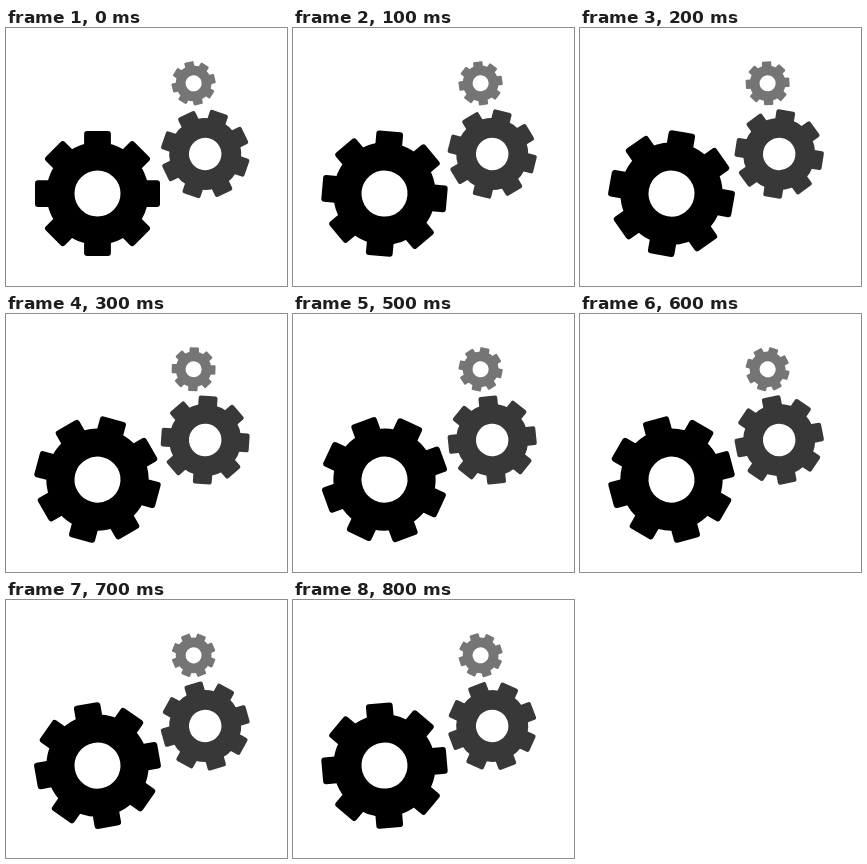
These frames come from a looping animation (281 by 258 pixels, 0.9 s). An HTML page:

```html
<!DOCTYPE html>
<html lang="en">
<head>
<meta charset="utf-8">
<title>Gears</title>
<style>
  html, body { margin: 0; width: 100%; height: 100%; overflow: hidden; background: #fff; }
  svg { display: block; width: 100%; height: 100%; }
</style>
</head>
<body>
<svg viewBox="0 0 281 258">
  <defs>
    <g id="gear">
      <circle r="37" fill="none" stroke="currentColor" stroke-width="28"/>
      <g id="teeth" fill="currentColor"></g>
    </g>
  </defs>
  <g id="stage"></g>
</svg>
<script>
  const LOOP = 900, STEP = 100, TEETH = 8;
  const PITCH = 360 / TEETH;
  const TURN = PITCH / (LOOP / STEP);

  const gears = [
    { x: 91.5, y: 165.6, scale: 1, start: 0, dir: 1, color: '#000' },
    { x: 199.2, y: 126, scale: 0.705, start: 19, dir: -1, color: '#383838' },
    { x: 187.6, y: 55.3, scale: 0.35, start: -13, dir: 1, color: '#757575' }
  ];

  function add(parent, name, attrs) {
    const el = document.createElementNS('http://www.w3.org/2000/svg', name);
    for (const key in attrs) el.setAttribute(key, attrs[key]);
    return parent.appendChild(el);
  }

  const teeth = document.getElementById('teeth');
  for (let i = 0; i < TEETH; i++) {
    add(teeth, 'rect', {
      x: -13.4, y: -62.5, width: 26.8, height: 22, rx: 3,
      transform: `rotate(${i * PITCH})`
    });
  }

  const stage = document.getElementById('stage');
  for (const g of gears) g.el = add(stage, 'use', { href: '#gear', color: g.color });

  function draw(time) {
    const step = Math.floor((time % LOOP) / STEP);
    for (const g of gears) {
      const angle = g.start + g.dir * step * TURN;
      g.el.setAttribute('transform',
        `translate(${g.x} ${g.y}) rotate(${angle}) scale(${g.scale})`);
    }
  }

  const begin = performance.now();
  function tick() {
    draw(performance.now() - begin);
    requestAnimationFrame(tick);
  }
  tick();
</script>
</body>
</html>
```
